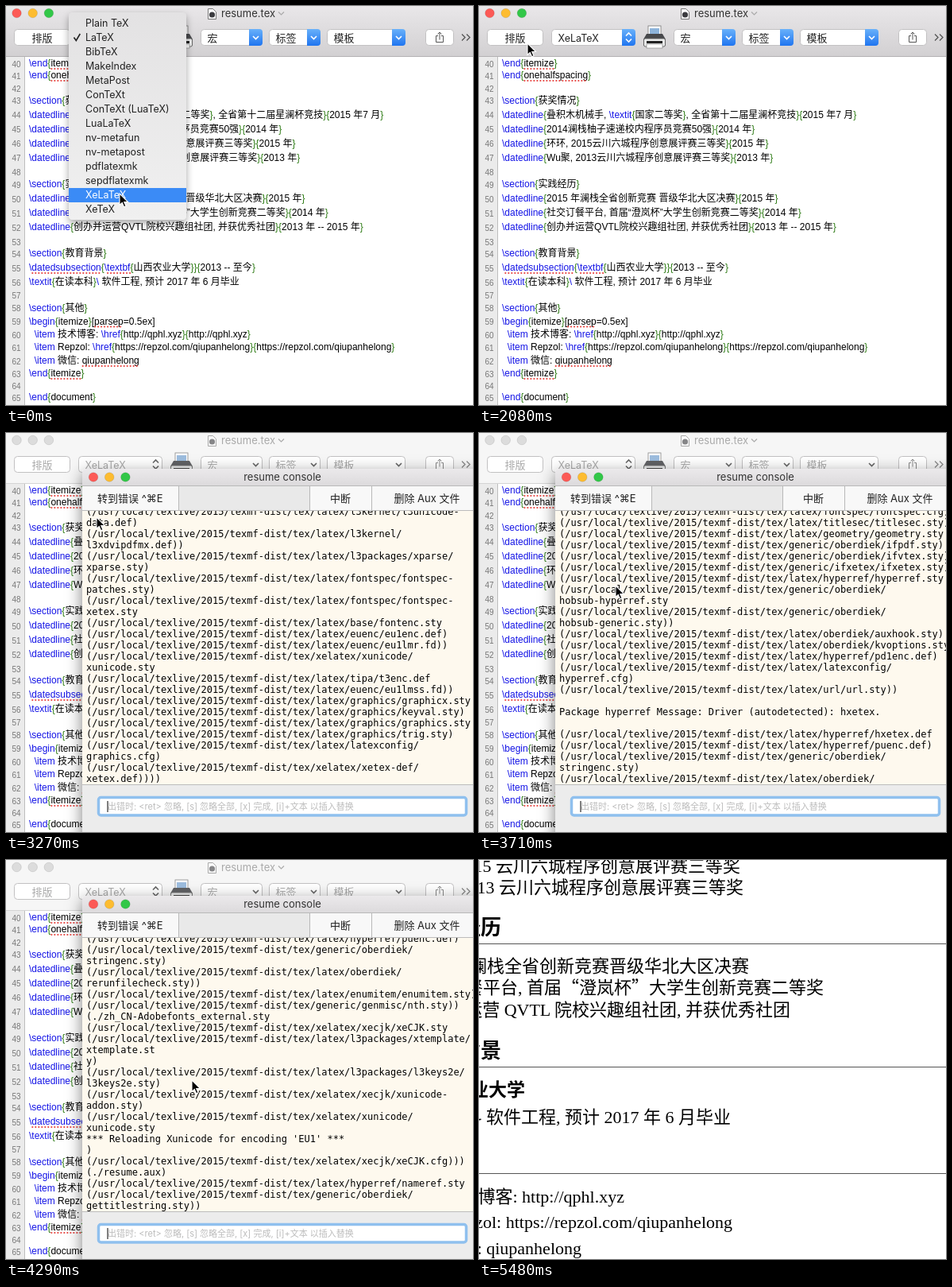
Recreate the animation shown at these times as an HTML page. Size 588x502 px, loop 6.67 s.

```html
<!DOCTYPE html>
<html lang="zh-CN">
<head>
<meta charset="utf-8">
<title>resume.tex</title>
<style>
  html, body { margin: 0; width: 588px; height: 502px; overflow: hidden; background: #fff; }
  svg { display: block; }
  text { white-space: pre; font-family: Inter, 'Noto Sans CJK SC', 'DejaVu Sans', sans-serif; }
  .code text { font: 12px 'Liberation Sans', 'Noto Sans CJK SC', sans-serif; }
  .code .num { font-size: 10px; fill: #777; text-anchor: end; }
  .cmd { fill: #1414e6; }
  .brace { fill: #2b7a12; }
  .log text { font: 12px 'DejaVu Sans Mono', monospace; }
  .page text { font: 300 22px 'Liberation Serif', 'Noto Sans CJK SC', serif; text-anchor: end; }
  .page .head { font: 700 26px 'Noto Sans CJK SC', sans-serif; }
  .page .sub { font: 700 23px 'Noto Sans CJK SC', sans-serif; }
  .page .wide { font-family: 'Noto Sans CJK SC', sans-serif; }
</style>
</head>
<body>
<svg id="stage" width="588" height="502" viewBox="0 0 588 502"></svg>
<script>
const LOOP = 6670, FIRST = 895, STEP = 147.8;
const stage = document.getElementById('stage');

const rect = (x, y, w, h, fill, more = '') =>
  `<rect x="${x}" y="${y}" width="${w}" height="${h}" fill="${fill}" ${more}/>`;
const line = (d, color, width = 1, more = '') =>
  `<path d="${d}" fill="none" stroke="${color}" stroke-width="${width}" ${more}/>`;
const escape = s => s.replace(/&/g, '&amp;').replace(/</g, '&lt;');
const label = (x, y, s, size = 13, fill = '#222', more = '') =>
  `<text x="${x}" y="${y}" font-size="${size}" fill="${fill}" ${more}>${escape(s)}</text>`;
const middle = 'text-anchor="middle"';
const group = (id, body, more = '') => `<g id="${id}" ${more}>${body}</g>`;

// Editor window
const lights = (x, y, active) => ['#fc5a56', '#fdbc30', '#32c748'].map((c, i) =>
  `<circle cx="${x + i * 20.2}" cy="${y}" r="5.8" fill="${active ? c : '#dcdcdc'}"
    stroke="#000" stroke-opacity=".13" stroke-width=".8"/>`).join('');

const button = (x, w) => rect(x + .5, 29.5, w - 1, 20, '#fff', 'rx="4" stroke="#c2c1c2"');

function popup(x, w, name, active, both) {
  const r = x + w, color = active ? '#fff' : '#666';
  const cap = `<path d="M${r - 17} 29h13a4 4 0 0 1 4 4v13a4 4 0 0 1-4 4h-13z" fill="url(#blue)"/>`;
  const arrow = both
    ? `M${r - 12} 37.5l3.5-3.5 3.5 3.5m-7 4l3.5 3.5 3.5-3.5`
    : `M${r - 12} 38l3.5 3.5 3.5-3.5`;
  return button(x, w) + (active ? cap : '') + line(arrow, color, 1.6) +
    label(x + 8.5, 44.5, name, both ? 12.5 : 13, active ? '#222' : '#a9a9a9');
}

const printer = `
  ${rect(213, 25, 16, 13, '#fff', 'stroke="#777" stroke-width=".8"')}
  ${rect(215, 28, 12, 8, '#8db3da')}
  <path d="M211 35h20l4 7v8h-28v-8z" fill="#47484b"/>
  ${rect(207.5, 41, 27, 10, '#eceded', 'rx="2" stroke="#666"')}
  ${rect(211, 44, 20, 3, '#222')}
  ${rect(211, 48, 20, 5, '#fff', 'stroke="#888" stroke-width=".7"')}`;

function toolbar(active) {
  const ink = active ? '#222' : '#a9a9a9', icon = active ? '#555' : '#888';
  return rect(0, 0, 588, 63, active ? 'url(#chrome)' : '#f6f6f6') +
    rect(0, 63, 588, 1, active ? '#b3b1b3' : '#d4d4d4') +
    lights(13.5, 9, active) +
    `<g opacity="${active ? 1 : .6}">` +
    line('M254.5 3.5h6l4 4v9h-10z', '#777', 1, 'style="fill:#fff"') +
    '<circle cx="259.5" cy="11" r="3.6" fill="#3c3c40"/></g>' +
    label(271, 14, 'resume.tex', 13, active ? '#333' : '#aaa') +
    line('M343 7.5l3.5 3.5 3.5-3.5', '#aaa', 1.2) +
    button(10, 71) + label(45.5, 44.5, '排版', 13, ink, middle) +
    popup(91, 106, 'XeLaTeX', active, true) +
    `<g opacity="${active ? 1 : .85}">${printer}</g>` +
    popup(245, 78, '宏', active) + popup(331, 65, '标签', active) + popup(404, 99, '模板', active) +
    button(528, 36) +
    line('M544 37.5h-2.5v8h9v-8H548M546 42.5v-9.5m-2.5 2.5l2.5-2.5 2.5 2.5', icon) +
    line('M574 35.5l4 4-4 4m6-8l4 4-4 4', icon, 1.3);
}

const source = String.raw`\end{itemize}
\end{onehalfspacing}

\section{获奖情况}
\datedline{叠积木机械手, \textit{国家二等奖}, 全省第十二届星澜杯竞技}{2015 年7 月}
\datedline{2014澜栈柚子速递校内程序员竞赛50强}{2014 年}
\datedline{环环, 2015云川六城程序创意展评赛三等奖}{2015 年}
\datedline{Wu聚, 2013云川六城程序创意展评赛三等奖}{2013 年}

\section{实践经历}
\datedline{2015 年澜栈全省创新竞赛 晋级华北大区决赛}{2015 年}
\datedline{社交订餐平台, 首届“澄岚杯”大学生创新竞赛二等奖}{2014 年}
\datedline{创办并运营QVTL院校兴趣组社团, 并获优秀社团}{2013 年 -- 2015 年}

\section{教育背景}
\datedsubsection{\textbf{山西农业大学}}{2013 -- 至今}
\textit{在读本科}\ 软件工程, 预计 2017 年 6 月毕业

\section{其他}
\begin{itemize}[parsep=0.5ex]
  \item 技术博客: \href{http://qphl.xyz}{http://qphl.xyz}
  \item Repzol: \href{https://repzol.com/qiupanhelong}{https://repzol.com/qiupanhelong}
  \item 微信: qiupanhelong
\end{itemize}

\end{document}`.split('\n');
const baselines = [76, 91, 107, 122.5, 140.5, 158.5, 176.5, 194.5, 212, 228, 246, 264, 282,
  300, 315, 333, 351, 367, 383.5, 400.5, 417, 433, 450, 466, 481, 496];
const misspelt = /(?<=end\{)itemize|onehalfspacing|datedsubsection|textbf|parsep|qiupanhelong$/g;

const highlight = s => escape(s)
  .replace(/\\[a-z]*|[{}]/g, t => `<tspan class="${t[0] === '\\' ? 'cmd' : 'brace'}">${t}</tspan>`);
const editor = rect(0, 64, 588, 438, '#fff') + rect(0, 64, 24, 438, '#ebebeb') +
  rect(23, 64, 1, 438, '#bdbdbd') +
  source.map((s, i) => `<text class="num" x="18.5" y="${baselines[i] + .5}">${40 + i}</text>` +
    `<text class="src" x="29" y="${baselines[i]}">${highlight(s)}</text>`).join('');

// Engine menu
const engines = ['Plain TeX', 'LaTeX', 'BibTeX', 'MakeIndex', 'MetaPost', 'ConTeXt', 'ConTeXt (LuaTeX)',
  'LuaLaTeX', 'nv-metafun', 'nv-metapost', 'pdflatexmk', 'sepdflatexmk', 'XeLaTeX', 'XeTeX'];
const menu = rect(79, 8, 148, 261, 'url(#menuFill)', 'rx="5" filter="url(#shadow)"') +
  rect(79, 229, 148, 18, '#3b8bf6', 'id="choice"') +
  line('M85.5 39.5l2.8 4 5-8.5', '#222', 1.6) +
  engines.map((s, i) => label(100, 25.5 + i * 18, s, 12.5, '#222', s === 'XeLaTeX' ? 'id="chosen"' : '')).join('');
const closingMenu = rect(90, 27, 109, 40, '#e6e6e7', 'rx="5" filter="url(#shadow)"') +
  '<path d="M183 27h11a5 5 0 0 1 5 5v30a5 5 0 0 1-5 5h-11z" fill="url(#blue)"/>' +
  label(100, 42.5, 'sepdf...exmk', 12.5) + label(100, 60.5, 'XeLaTeX', 12.5);

// Console window
const log = `This is XeTeX, Version 3.14159265-2.6-0.99992 (TeX Live 2015)
 restricted \\write18 enabled.
entering extended mode
(./resume.tex
LaTeX2e <2015/01/01>
(./resume.cls
Document Class: resume
(@latex/base/article.cls
(@latex/base/size11.clo))
(@latex/fontspec/fontspec.sty
(@latex/l3kernel/expl3.sty
(@latex/l3kernel/expl3-code.tex)
(@latex/l3kernel/l3unicode-
data.def)
(@latex/l3kernel/
l3xdvipdfmx.def))
(@latex/l3packages/xparse/
xparse.sty)
(@latex/fontspec/fontspec-
patches.sty)
(@latex/fontspec/fontspec-
xetex.sty
(@latex/base/fontenc.sty
(@latex/euenc/eu1enc.def)
(@latex/euenc/eu1lmr.fd))
(@xelatex/xunicode/
xunicode.sty
(@latex/tipa/t3enc.def
(@latex/euenc/eu1lmss.fd))
(@latex/graphics/graphicx.sty
(@latex/graphics/keyval.sty)
(@latex/graphics/graphics.sty
(@latex/graphics/trig.sty)
(@latex/latexconfig/
graphics.cfg)
(@xelatex/xetex-def/
xetex.def))))
(@latex/fontspec/fontspec.cfg))
(@latex/titlesec/titlesec.sty)
(@latex/geometry/geometry.sty
(@generic/oberdiek/ifpdf.sty)
(@generic/oberdiek/ifvtex.sty)
(@generic/ifxetex/ifxetex.sty))
(@latex/hyperref/hyperref.sty
(@generic/oberdiek/
hobsub-hyperref.sty
(@generic/oberdiek/
hobsub-generic.sty))
(@latex/oberdiek/auxhook.sty)
(@latex/oberdiek/kvoptions.sty)
(@latex/hyperref/pd1enc.def)
(@latex/latexconfig/
hyperref.cfg)
(@latex/url/url.sty))

Package hyperref Message: Driver (autodetected): hxetex.

(@latex/hyperref/hxetex.def
(@latex/hyperref/puenc.def)
(@generic/oberdiek/
stringenc.sty)
(@latex/oberdiek/
rerunfilecheck.sty))
(@latex/enumitem/enumitem.sty)
(@generic/genmisc/nth.sty))
(./zh_CN-Adobefonts_external.sty
(@xelatex/xecjk/xeCJK.sty
(@latex/l3packages/xtemplate/
xtemplate.st
y)
(@latex/l3packages/l3keys2e/
l3keys2e.sty)
(@xelatex/xecjk/xunicode-
addon.sty)
(@xelatex/xunicode/
xunicode.sty
*** Reloading Xunicode for encoding 'EU1' ***
)
(@xelatex/xecjk/xeCJK.cfg)))
(./resume.aux)
(@latex/hyperref/nameref.sty
(@generic/oberdiek/
gettitlestring.sty))
(./resume.out) (./resume.out)
[1] (./resume.aux) )
Output written on resume.pdf (1 page).
Transcript written on resume.log.`.replace(/@/g, '/usr/local/texlive/2015/texmf-dist/tex/').split('\n');

const consoleWindow = rect(96, 45, 520, 480, '#ececec', 'rx="5" filter="url(#bigShadow)"') +
  rect(96, 45, 500, 30, 'url(#title)', 'rx="5"') + rect(96, 66, 492, 31, '#e9e9e9') +
  [[96, 121], [383, 77], [461, 127]].map(([x, w]) => rect(x, 67, w, 30, '#f8f8f8')).join('') +
  line('M96 66.5h492M217.5 66v31M382.5 66v31M460.5 66v31', '#b9b9b9') +
  lights(110, 55.5, true) + label(348, 60, 'resume console', 13, '#333', middle) +
  label(115, 86.5, '转到错误 ^⌘E') + label(421, 86.5, '中断', 13, '#222', middle) +
  label(530, 86.5, '删除 Aux 文件', 13, '#222', middle) +
  rect(96, 97, 492, 345, '#fef9ee') + line('M96 97.5h492M96 442.5h492', '#bcbcbc') +
  `<g class="log" clip-path="url(#logArea)"><g id="lines">${
    log.map((s, i) => label(101, i * 14, s, 12, '#000')).join('')}</g></g>` +
  rect(116.5, 458.5, 463, 22.5, '#fff', 'rx="3" stroke="#8fc0ee" stroke-width="3.5"') +
  label(128, 474, '出错时: <ret> 忽略, [s] 忽略全部, [x] 完成, [i]+文本 以插入替换', 11, '#bcbcbc') +
  rect(127.5, 463, 1, 14, '#000');

// Typeset page: right edge, baseline, text, style
const page = rect(0, 0, 588, 502, '#fff') + [
  [329, 15, '2015 云川六城程序创意展评赛三等奖'],
  [333, 42, '2013 云川六城程序创意展评赛三等奖'],
  [28, 94, '实践经历', 'head'],
  [340, 141, '2015 年澜栈全省创新竞赛晋级华北大区决赛'],
  [434, 168, '社交订餐平台, 首届“澄岚杯”大学生创新竞赛二等奖'],
  [392, 196, '创办并运营 QVTL 院校兴趣组社团, 并获优秀社团'],
  [28, 249, '教育背景', 'head'],
  [58, 297, '山西农业大学', 'sub'],
  [317, 331, '在读本科 软件工程, 预计 2017 年 6 月毕业'],
  [183, 431, '技术博客: http://qphl.xyz'],
  [319, 463, 'Repzol: https://repzol.com/qiupanhelong'],
  [129, 496, '微信: qiupanhelong']
].map(([x, y, s, style = '']) => `<text x="${x}" y="${y}" class="${style}">${
  s.replace(/[“”]/g, '<tspan class="wide">$&</tspan>')}</text>`).join('') +
  line('M0 105.5h588M0 260.5h588M0 394.5h588', '#555');

const gradient = (id, from, to) => `<linearGradient id="${id}" x2="0" y2="1">
  <stop stop-color="${from}"/><stop offset="1" stop-color="${to}"/></linearGradient>`;
const shadow = (id, dy, blur, alpha) => `<filter id="${id}" x="-30%" y="-30%" width="160%" height="160%">
  <feDropShadow dx="0" dy="${dy}" stdDeviation="${blur}" flood-opacity="${alpha}"/></filter>`;

stage.innerHTML = `<defs>
  ${gradient('chrome', '#e9e7e9', '#d2d0d2')}${gradient('blue', '#69b1fa', '#1f75f0')}
  ${gradient('menuFill', '#e3e2e3', '#f0f0f0')}${gradient('title', '#ebe9eb', '#d6d4d6')}
  ${shadow('shadow', 4, 5, .35)}${shadow('bigShadow', 6, 10, .5)}
  <clipPath id="logArea">${rect(96, 98, 492, 344, '#000')}</clipPath></defs>` +
  group('editor', editor, 'class="code"') +
  group('active', toolbar(true)) + group('inactive', toolbar(false)) +
  group('menu', menu) + group('closingMenu', closingMenu) +
  group('console', consoleWindow) + group('page', page, 'class="page"') +
  group('cursor', `<path d="M0 0v14.5l3.3-3.1 2.3 5.3 2.4-1-2.3-5.2h4.8z"
    fill="#000" stroke="#fff" stroke-width="1.1"/>`);

const get = id => document.getElementById(id);
const show = (el, on) => { el.style.display = on ? '' : 'none'; };

// Spelling marks follow the measured words
document.querySelectorAll('.src').forEach((el, i) => {
  for (const m of source[i].matchAll(misspelt)) {
    const from = el.getStartPositionOfChar(m.index).x + 1;
    const to = el.getEndPositionOfChar(m.index + m[0].length - 1).x;
    get('editor').insertAdjacentHTML('beforeend', line(`M${from} ${baselines[i] + 3}H${to}`,
      '#e8403c', 2.2, 'stroke-dasharray="0 4" stroke-linecap="round"'));
  }
});

const cursorPath = [[-1, 143, 236], [0, 143, 236], [2, 133, 204], [6, 72, 66], [8, 61, 47], [9, 61, 47],
  [10, 59, 45], [11, 57, 43], [13, 57, 43], [14, 66, 56], [16, 114, 106], [21, 210, 249],
  [25, 305, 361], [28, 336, 360], [29, 340, 362], [30, 345, 365]];
const logPath = [[13, 0], [14, 5], [16, log.indexOf('xetex.def))))') + 1],
  [21, log.indexOf(')') + 1], [23, log.length]];

function along(keys, k) {
  const i = keys.findIndex(key => key[0] >= k);
  if (i < 0) return keys.at(-1).slice(1);
  if (i === 0) return keys[0].slice(1);
  const a = keys[i - 1], b = keys[i], f = (k - a[0]) / (b[0] - a[0]);
  return a.slice(1).map((v, j) => v + (b[j + 1] - v) * f);
}

const logLines = [...get('lines').children];
let shownStep;

function render(ms) {
  const k = Math.max(-1, Math.min(31, Math.floor((ms % LOOP - FIRST) / STEP)));
  if (k === shownStep) return;
  shownStep = k;

  show(get('active'), k < 13);
  show(get('inactive'), k >= 13);
  show(get('menu'), k < 2);
  show(get('closingMenu'), k === 2);
  show(get('choice'), k !== 0);
  get('chosen').setAttribute('fill', k === 0 ? '#222' : '#fff');
  show(get('console'), k >= 13 && k < 24);
  show(get('page'), k >= 24);

  const count = Math.round(along(logPath, k)[0]);
  logLines.forEach((el, i) => show(el, i < count));
  get('lines').setAttribute('transform', `translate(0 ${Math.min(111, 439 - 14 * (count - 1))})`);

  const [x, y] = along(cursorPath, k).map(Math.round);
  get('cursor').setAttribute('transform', `translate(${x} ${y})`);
  show(get('cursor'), k < 31);
}

function tick(now) {
  render(now);
  requestAnimationFrame(tick);
}
render(0);
requestAnimationFrame(tick);
</script>
</body>
</html>
```
